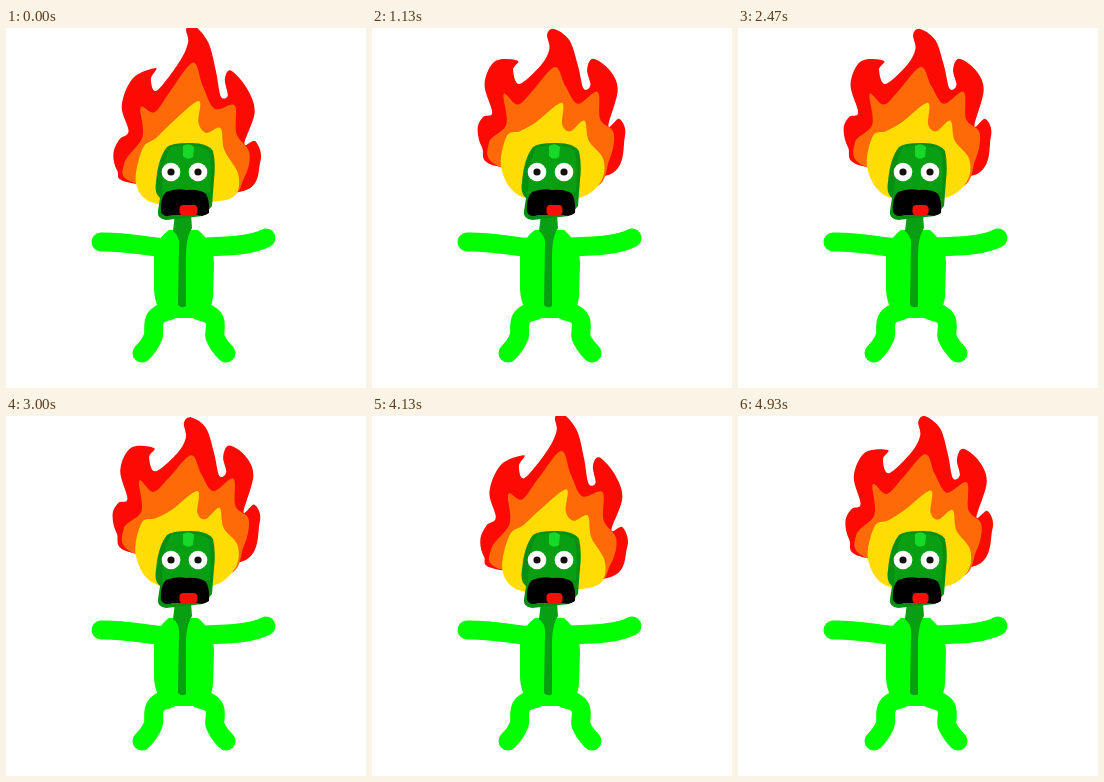
Write an HTML page that moves like this. It is 360 px wide and 360 px high and loops after 5 s.

```html
<!DOCTYPE html>
<html lang="en">
<head>
<meta charset="utf-8">
<title>Flaming head</title>
<style>
  html, body { margin: 0; width: 100%; height: 100%; overflow: hidden; background: #fff; }
  svg { display: block; width: 100%; height: 100%; }
  .limb { fill: none; stroke: #0f0; stroke-width: 19; stroke-linecap: round; stroke-linejoin: round; }
</style>
</head>
<body>
<svg viewBox="0 0 360 360">
  <path id="red" fill="#fc0a04"/>
  <path id="orange" fill="#ff6a08"/>
  <path id="yellow" fill="#ffdc04"/>

  <g class="limb">
    <path d="M95 214C112 213 132 217 160 220"/>
    <path d="M260 210C246 217 228 218 198 219"/>
    <path d="M163 283C141 287 150 302 147 309Q144 317 136 325"/>
    <path d="M193 283C217 287 207 302 209 309Q212 317 220 325"/>
  </g>
  <path fill="#0f0" d="M163 202L192 202C202 210 208 222 208 236L207 268C206 282 198 290 190 290L166 290C154 288 149 276 148 262L148 226C150 214 156 207 163 202Z"/>
  <path fill="#08a012" d="M169 186L185 186L186 200C181 208 180 218 180 232L180 278Q176 281 172 277L173 215Q173 208 167 203Z"/>

  <path fill="#078f12" d="M161 119Q166 115 182 115Q201 114 207 123Q210 136 208 152L206 178L197 188L160 192Q151 191 152 183L154 170Q148 165 150 154Q152 130 161 119Z"/>
  <path fill="#08a012" d="M165 119Q190 114 203 123Q206 140 204 164L156 166Q157 130 165 119Z"/>
  <path fill="#18d928" d="M177 118Q183 114 188 119L187 129Q181 133 177 128Z"/>

  <g fill="#fff">
    <circle cx="165" cy="144" r="9.3"/>
    <circle cx="192" cy="144" r="9.3"/>
  </g>
  <g fill="#151010">
    <circle cx="165" cy="144" r="3.6"/>
    <circle cx="192" cy="144" r="3.6"/>
  </g>
  <path fill="#000" d="M160 164Q170 160 180 162Q194 161 200 166Q204 173 203 185Q198 189 191 187L166 187Q158 190 155 184Q154 170 160 164Z"/>
  <rect id="tongue" y="177" height="10.5" rx="4" fill="#f81008"/>
</svg>
<script>
const LOOP = 5000, STEPS = 75, CYCLE = 10, AXIS = 181;

// Key points of each flame layer at rest, clockwise from the lower left.
const layers = {
  red: "126,146 111,130 107,112 113,99 122,93 115,66 126,41 149,36 144,46 150,59 172,36 181,18 179,4 186,-1 201,13 209,40 214,64 221,62 218,46 224,36 240,50 248,72 238,106 249,101 254,120 234,155",
  orange: "128,146 118,124 136,102 134,72 148,80 164,62 186,37 196,58 208,78 228,70 230,98 243,114 238,140 218,164",
  yellow: "150,172 130,148 136,114 150,106 166,94 192,74 192,96 200,104 214,96 218,117 232,138 229,160 205,172"
};
const el = id => document.getElementById(id);
const parse = text => text.split(" ").map(p => p.split(",").map(Number));
const rest = Object.entries(layers).map(([id, text]) => [el(id), parse(text)]);

// The top sways sideways; the flanks rise and fall against the centre.
function flicker([x, y], angle) {
  const sway = 4 * (1 - y / 170) * Math.sin(angle + 0.3);
  const lift = (19 * Math.abs(x - AXIS) / 72 - 4) * Math.cos(angle - 0.5);
  return [x + sway, y + lift];
}

// Closed Catmull-Rom curve through the points.
function smooth(pts) {
  const n = pts.length, at = i => pts[(i + n) % n];
  let d = "M" + pts[0];
  for (let i = 0; i < n; i++) {
    const [a, b, c, e] = [at(i - 1), at(i), at(i + 1), at(i + 2)];
    const c1 = b.map((v, k) => v + (c[k] - a[k]) / 6);
    const c2 = c.map((v, k) => v - (e[k] - b[k]) / 6);
    d += `C${c1} ${c2} ${c}`;
  }
  return d + "Z";
}

function draw(time) {
  // Steps begin on the nearest 10 ms.
  const snapped = Math.floor(time % LOOP / 10) * 10 + 5;
  const step = Math.floor(snapped * STEPS / LOOP) % STEPS;
  const angle = 2 * Math.PI * step / CYCLE;
  for (const [path, pts] of rest)
    path.setAttribute("d", smooth(pts.map(p => flicker(p, angle))));
  const width = step % 3 ? 16 : 18;
  el("tongue").setAttribute("x", 182.5 - width / 2);
  el("tongue").setAttribute("width", width);
}

const start = performance.now();
function tick() {
  draw(performance.now() - start);
  requestAnimationFrame(tick);
}
tick();
</script>
</body>
</html>
```
